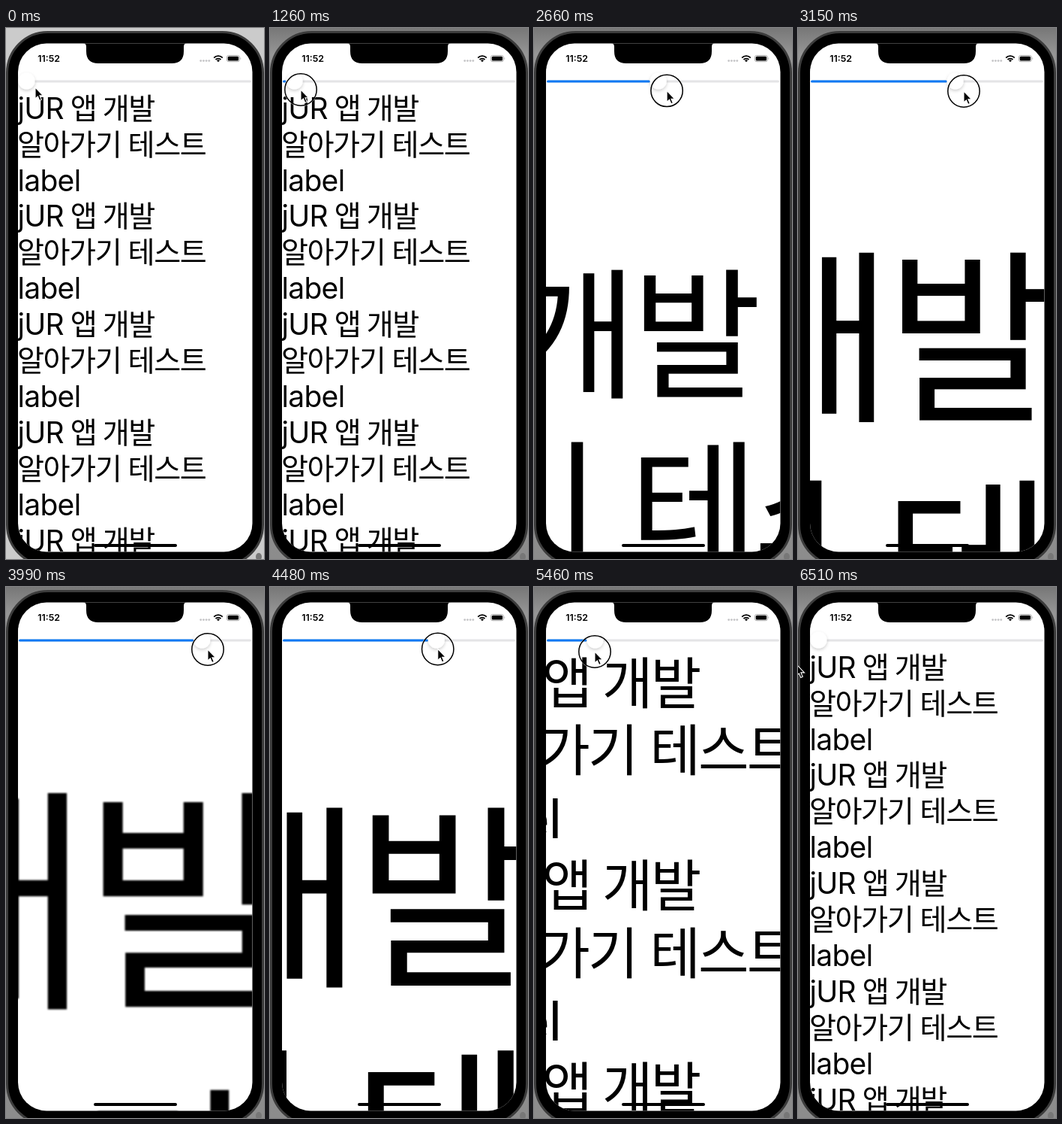
Write an HTML page that moves like this. It is 344 px wide and 706 px high and loops after 6.65 s.

```html
<!DOCTYPE html>
<html lang="ko">
<head>
<meta charset="utf-8">
<title>Slider zoom</title>
<style>
html, body { margin: 0; width: 100%; height: 100%; overflow: hidden; background: #8c8c8c; }
svg { display: block; width: 344px; height: 706px; }
text { white-space: pre; }
.latin { font: 400 39px Inter, sans-serif; letter-spacing: -.7px; }
.hangul { font: 400 39.2px "Noto Sans CJK KR", "Noto Sans CJK", "Noto Sans CJK JP", sans-serif; letter-spacing: -1.5px; }
.clock { font: 600 12.4px Inter, sans-serif; }
</style>
</head>
<body>
<svg viewBox="0 0 344 706">
  <defs>
    <clipPath id="screenClip"><rect x="16" y="20.5" width="312.5" height="676" rx="38"/></clipPath>
    <clipPath id="scrollClip"><rect x="16" y="84" width="312.5" height="613"/></clipPath>
    <linearGradient id="shade" x2="0" y2="1">
      <stop offset="0" stop-color="#777"/>
      <stop offset=".05" stop-color="#969696"/>
      <stop offset="1" stop-color="#8c8c8c"/>
    </linearGradient>
    <filter id="soft" x="-50%" y="-50%" width="200%" height="200%">
      <feDropShadow dx="0" dy="2" stdDeviation="2.2" flood-opacity=".2"/>
    </filter>
  </defs>

  <rect width="344" height="706" fill="url(#shade)"/>
  <rect id="idle" width="344" height="706" fill="#cbcbcb"/>
  <rect x="1.5" y="5.5" width="341" height="709" rx="54" stroke="#3c3c3c" stroke-width="3"/>
  <ellipse cx="337" cy="703" rx="4" ry="5" fill="#777"/>

  <g clip-path="url(#screenClip)">
    <rect x="16" y="20" width="313" height="677" fill="#fff"/>
    <g clip-path="url(#scrollClip)"><g id="blur"><g id="zoom"></g></g></g>
    <path d="M102 20q5 0 5 5v6q0 16 16 16h98q16 0 16-16v-6q0-5 5-5z"/>

    <text class="clock" x="42.3" y="45">11:52</text>
    <g fill="#c4c4c6">
      <circle cx="259.7" cy="43.6" r="1.4"/><circle cx="263.4" cy="43.6" r="1.4"/>
      <circle cx="267.1" cy="43.6" r="1.4"/><circle cx="270.8" cy="43.6" r="1.4"/>
    </g>
    <g fill="none" stroke="#000" stroke-width="1.8">
      <path d="M277.2 39.6a8 8 0 0 1 11.6 0M279.5 42a4.9 4.9 0 0 1 7 0"/>
    </g>
    <path d="M283 45.3l-2-2.1q2-1.7 4 0z"/>
    <rect x="294.4" y="36.5" width="17" height="8.2" rx="2.6" fill="none" stroke="#999" stroke-width=".8"/>
    <rect x="295.7" y="37.8" width="14.4" height="5.6" rx="1.5"/>
    <path d="M312.6 39v3q1.4-1.5 0-3z" fill="#999"/>

    <rect x="17" y="69.4" width="310" height="3.2" rx="1.6" fill="#e4e4e6"/>
    <rect id="fill" x="17" y="69.4" height="3.2" rx="1.6" fill="#0878f4"/>
    <circle id="thumb" cy="70.5" r="11" fill="#fff" filter="url(#soft)"/>
    <rect x="117" y="686" width="111" height="4" rx="2"/>
  </g>

  <g id="pointer">
    <g id="ring" fill="none">
      <circle r="22.2" stroke="#fff" stroke-opacity=".6" stroke-width="1"/>
      <circle r="21.2" stroke="#000" stroke-width="1.5"/>
    </g>
    <path d="M0 0V15L3.4 11.9 5.8 17.4 8.3 16.3 5.9 10.9H10.5Z" stroke="#fff" stroke-width="1.1"/>
  </g>
</svg>
<script>
const LOOP = 6650, STEP = 70;
const MIN_X = 27.5, RANGE = 288.5;
const GRAB = 7, LAG = 48;
const $ = id => document.getElementById(id);
const set = (id, attrs) => {
  for (const k in attrs) $(id).setAttribute(k, attrs[k]);
};

// Repeating three-line label
const word = (cls, x, s) => `<tspan class="${cls}" x="${x}">${s}</tspan>`;
const lines = [
  word('latin', 15.5, 'jUR') + word('hangul', 85.8, '앱') + word('hangul', 128.8, '개발'),
  word('hangul', 15, '알아가기') + word('hangul', 162.6, '테스트'),
  word('latin', 15.5, 'label')
];
let label = '';
for (let i = 0; i < 13; i++) label += `<text y="${120.7 + 47.9 * i}">${lines[i % 3]}</text>`;
$('zoom').innerHTML = label;

// Pointer path: time, x, y
const path = [
  [0, 39, 79], [210, 35, 77], [1050, 35, 77], [1260, 41, 82], [1750, 74, 82],
  [2100, 120, 82.5], [2310, 152, 83], [2380, 152, 83], [3150, 221, 84],
  [3710, 268, 83], [3920, 268, 83], [3990, 269, 83], [4060, 269, 83],
  [4830, 186, 82], [5390, 92, 83], [5530, 70, 89], [5950, 0, 103],
  [6440, 0, 103], [6510, -2, 103], [LOOP, -2, 103]
];

function pointerAt(t) {
  const i = Math.max(1, path.findIndex(p => p[0] >= t));
  const [t0, x0, y0] = path[i - 1], [t1, x1, y1] = path[i];
  const k = Math.max(0, (t - t0) / (t1 - t0));
  return [x0 + (x1 - x0) * k, y0 + (y1 - y0) * k];
}

const clamp = (v, a, b) => Math.min(b, Math.max(a, v));

function draw(t) {
  const [x, y] = pointerAt(t);
  const dragging = t >= 1050 && t < 6440;
  const thumb = dragging ? clamp(pointerAt(t - LAG)[0] - GRAB, MIN_X, MIN_X + RANGE) : MIN_X;
  const scale = Math.max(1, 10 * (thumb - MIN_X) / RANGE);

  set('thumb', { cx: thumb });
  set('fill', { width: Math.max(0, thumb - 11 - 17) });
  set('zoom', { transform: `translate(172 390) scale(${scale}) translate(-172 -390)` });
  $('blur').style.filter = scale > 2.5 ? `blur(${scale * .1}px)` : 'none';

  const press = clamp((t - 770) / 210, 0, 1);
  const release = clamp((6510 - t) / 140, 0, 1);
  set('pointer', { transform: `translate(${x} ${y})` });
  set('ring', {
    transform: `scale(${1.3 - .3 * press})`,
    opacity: Math.min(press, t < 6440 ? 1 : release)
  });
  set('idle', { opacity: clamp((630 - t) / 140, 0, 1) });
}

function tick() {
  const t = performance.now() % LOOP;
  draw(Math.floor(t / STEP) * STEP);
  requestAnimationFrame(tick);
}
tick();
</script>
</body>
</html>
```
